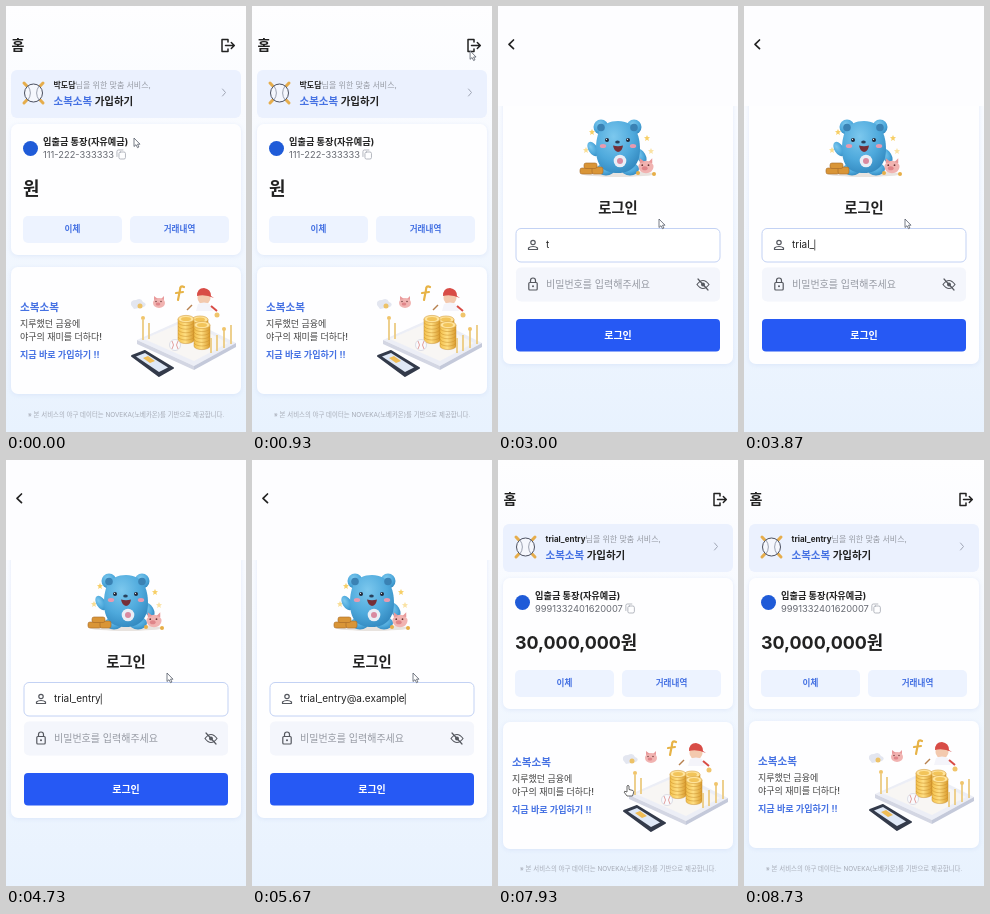
An HTML page that plays this animation: 240x426 px, repeating every 8.79 s.

```html
<!DOCTYPE html>
<html lang="ko">
<head>
<meta charset="utf-8">
<title>홈</title>
<style>
  html, body { margin: 0; width: 100%; height: 100%; overflow: hidden; background: #fff; }
  svg { display: block; width: 100vw; height: 100vh; }
  text { font-family: Inter, "Noto Sans CJK KR", "Noto Sans CJK", sans-serif; fill: #222; white-space: pre; }
  .b { font-weight: 700; }
  .blue { fill: #4672e3; }
  .mid { text-anchor: middle; }
  .hint { fill: #969aa3; }
  .line { fill: none; stroke: #222; stroke-linecap: round; stroke-linejoin: round; }
  .card { fill: #fefeff; filter: drop-shadow(0 1px 2px #b9cdf055); }
</style>
</head>
<body>
<svg viewBox="0 0 240 426" preserveAspectRatio="none">
  <defs>
    <linearGradient id="bg" x2="0" y2="1">
      <stop offset="0" stop-color="#fefeff"/><stop offset=".16" stop-color="#fbfcff"/>
      <stop offset="1" stop-color="#e8f2fe"/>
    </linearGradient>
    <linearGradient id="gold">
      <stop offset="0" stop-color="#f3c04b"/><stop offset=".45" stop-color="#ffdf83"/>
      <stop offset="1" stop-color="#d99a2b"/>
    </linearGradient>
    <radialGradient id="fur" cx=".4" cy=".3" r=".75">
      <stop offset="0" stop-color="#7cc8ee"/><stop offset=".6" stop-color="#4ea9dc"/>
      <stop offset="1" stop-color="#3288bf"/>
    </radialGradient>
    <path id="star" d="M0-3 .9-.9 3-.8 1.3.7 1.9 3 0 1.7-1.9 3-1.3.7-3-.8-.9-.9Z" fill="#f7cf67"/>
    <g id="pig">
      <ellipse rx="6" ry="5" fill="#f1b3b1"/><path d="M-5-3-5-7-1-4M2-4 5-7 5-3" fill="#e99a9b"/>
      <ellipse cx="-1" cy="1" rx="2.3" ry="1.6" fill="#df8589"/>
      <circle cx="-3" cy="-1.5" r=".7" fill="#633"/><circle cx="2" cy="-1.5" r=".7" fill="#633"/>
    </g>
    <g id="ball">
      <circle r="5.5" fill="#fafafd" stroke="#c8cbd8" stroke-width=".6"/>
      <path d="M-3-4Q0 0-3 4M3-4Q0 0 3 4" fill="none" stroke="#d77b77" stroke-width=".7"/>
    </g>
  </defs>

  <rect width="240" height="426" fill="url(#bg)"/>

  <g id="home">
    <text x="5.5" y="44" font-size="14" font-weight="600">홈</text>
    <path class="line" stroke-width="1.5" d="M222 36V33.5H216V45.500H222V43M219.500 39.500H228M225.300 36.500 228.300 39.500 225.300 42.500"/>

    <rect x="5" y="64" width="230" height="48" rx="6" fill="#ebf1fe"/>
    <g>
      <path d="M18 77 37 97M37 77 18 97" stroke="#e6ad4c" stroke-width="3" stroke-linecap="round"/>
      <circle cx="27.500" cy="87" r="9" fill="#f5f7fd" stroke="#4b5060"/>
      <path class="line" style="stroke:#858b9c" stroke-width=".8" d="M22 80Q27 87 22 94M33 80Q28 87 33 94"/>
    </g>
    <text x="47.500" y="82" font-size="8"><tspan id="name" class="b"></tspan><tspan class="hint">님을 위한 맞춤 서비스,</tspan></text>
    <text class="b" x="47.500" y="98.500" font-size="10.5"><tspan class="blue">소복소복</tspan> 가입하기</text>
    <path class="line" style="stroke:#a0a6b5" d="M216.500 83 219.500 86.500 216.500 90"/>

    <rect class="card" x="5" y="118" width="230" height="131" rx="7"/>
    <circle cx="24.500" cy="142.500" r="7.500" fill="#1f5bd8"/>
    <text class="b" x="37" y="138.500" font-size="9.2">입출금 통장(자유예금)</text>
    <text id="account" x="37" y="151.500" font-size="9.300" style="fill:#686b73"></text>
    <g id="copy" class="line" style="stroke:#a2a6b0" stroke-width=".8">
      <rect x="2" y="146" width="6.500" height="7" rx="1.500"/><path d="M0 150.500V145.500Q0 144 1.500 144H6"/>
    </g>
    <text id="balance" class="b" x="17" y="188.500" font-size="17.900"></text>
    <rect x="17" y="210" width="99" height="27" rx="5" fill="#edf3ff"/>
    <rect x="124" y="210" width="99" height="27" rx="5" fill="#edf3ff"/>
    <text class="b blue mid" x="66.500" y="226.300" font-size="8.600">이체</text>
    <text class="b blue mid" x="173.500" y="226.300" font-size="8.600">거래내역</text>

    <g id="promo">
      <rect class="card" x="5" y="261" width="230" height="127" rx="7"/>
      <text class="b blue" x="14" y="305" font-size="10.600">소복소복</text>
      <text x="14" y="321" font-size="9" font-weight="500" style="fill:#444">지루했던 금융에</text>
      <text x="14" y="333.500" font-size="9" font-weight="500" style="fill:#444">야구의 재미를 더하다!</text>
      <text class="b blue" x="14" y="352" font-size="9.100">지금 바로 가입하기 !!</text>
      <path d="M131 334 180 312 230 337 188 360Z" fill="#eceef6"/>
      <path d="M131 334 188 360V364L131 338Z" fill="#d3d6e3"/><path d="M188 360 230 337V341L188 364Z" fill="#c4c9da"/>
      <path d="M138 333 180 315 222 337 188 355Z" fill="#f8f6f4"/>
      <g id="coins"></g>
      <path d="M137 314V334M143 317V333M205 332V347M211 329V345M218 324V342M225 319V338" stroke="#eccb82" stroke-width="1.800"/>
      <g fill="#f0c56b"><circle cx="137" cy="312" r="2"/><circle cx="218" cy="323" r="2"/><circle cx="211" cy="309" r="2.500"/></g>
      <use href="#ball" x="169" y="339"/>
      <path d="M126 350 139 345 167 362 153 370Z" fill="#333a4a" stroke="#333a4a" stroke-width="2" stroke-linejoin="round"/>
      <path d="M130 350.500 139 347 162 361.500 153 366Z" fill="#dfe8f6"/>
      <path d="M137 352 142 350 149 355 144 357Z" fill="#f0bd55"/>
      <use href="#pig" x="153" y="297"/>
      <path d="M125 299Q124 294 130 294 135 291 137 296 142 298 138 301L128 303Z" fill="#e3e6f0"/>
      <circle cx="134" cy="300" r="2.500" fill="#edc267"/>
      <path d="M178 281Q174 279 174 284L172 294M170 287 177 286" fill="none" stroke="#e7b347" stroke-width="2.200" stroke-linecap="round"/>
      <circle cx="198" cy="292" r="6.500" fill="#f3c9ae"/>
      <path d="M191 290Q191 282 198 282 205 283 205 290L208 292Q199 288 191 290Z" fill="#d84c46"/>
      <path d="M192 298Q198 295 204 298L207 305H190Z" fill="#f4f4fa"/><path d="M205 300 211 305" stroke="#d84c46" stroke-width="2"/>
      <path d="M181 304 186 299" stroke="#b78150" stroke-width="1.500"/>
    </g>
    <text class="mid" x="120" y="410.500" font-size="6.400" style="fill:#a5aab5">※ 본 서비스의 야구 데이터는 NOVEKA(노베카온)를 기반으로 제공합니다.</text>
  </g>

  <g id="login">
    <rect class="card" x="5" y="92" width="230" height="266" rx="7"/>
    <rect width="240" height="100" fill="#fdfdff"/>
    <path class="line" stroke-width="1.700" d="M15.500 34 11 38.300 15.500 42.600"/>
    <g id="bear">
      <use href="#star" x="94" y="126"/><use href="#star" x="149" y="132"/>
      <use href="#star" x="88" y="144" opacity=".7"/><use href="#star" x="153" y="145" opacity=".6"/>
      <ellipse cx="120" cy="168" rx="36" ry="3" fill="#e8e3df"/>
      <g fill="url(#fur)">
        <circle cx="103" cy="121" r="7.500"/><circle cx="136" cy="121" r="7.500"/>
        <ellipse cx="95" cy="143" rx="4.500" ry="8" transform="rotate(-32 95 143)"/>
        <ellipse cx="143" cy="150" rx="4.500" ry="8" transform="rotate(-30 143 150)"/>
        <ellipse cx="108" cy="163" rx="9" ry="6.500"/><ellipse cx="132" cy="163" rx="9" ry="6.500"/>
        <path d="M120 115C137 115 142 129 142 143S135 167 120 167 98 159 98 143 103 115 120 115Z"/>
      </g>
      <circle cx="103" cy="121.500" r="3.800" fill="#3a82b4"/><circle cx="136" cy="121.500" r="3.800" fill="#3a82b4"/>
      <circle cx="109" cy="134" r="2" fill="#242b3b"/><circle cx="130" cy="134" r="2" fill="#242b3b"/>
      <circle cx="108.500" cy="133.300" r=".6" fill="#fff"/><circle cx="129.500" cy="133.300" r=".6" fill="#fff"/>
      <ellipse cx="105" cy="140" rx="3.200" ry="2" fill="#e69ab0"/><ellipse cx="135" cy="140" rx="3.200" ry="2" fill="#e69ab0"/>
      <ellipse cx="119.500" cy="136" rx="2.300" ry="1.500" fill="#29415c"/>
      <path d="M115 139.500Q120 141 125 139.500 124 146 120 146 116 145 115 139.500Z" fill="#762f37"/>
      <circle cx="122" cy="155" r="6.300" fill="#e9eef6"/><circle cx="122" cy="155" r="3" fill="#d98aa0"/>
      <g fill="#d99537" stroke="#a76928" stroke-width=".6">
        <rect x="82" y="162" width="13" height="6" rx="2"/><rect x="94" y="161" width="11" height="7" rx="2"/><rect x="86" y="157" width="13" height="5.500" rx="2"/>
      </g>
      <use href="#pig" transform="translate(148 161) scale(1.25)"/>
      <circle cx="140" cy="167" r="2" fill="#e7ae47"/><circle cx="156" cy="168" r="2" fill="#e7ae47"/>
    </g>
    <text class="b mid" x="120" y="207.300" font-size="14.300">로그인</text>
    <rect id="idBox" x="18" y="222.500" width="204" height="33.500" rx="5"/>
    <rect id="pwBox" x="18" y="261.500" width="204" height="34" rx="5"/>
    <g class="line" style="stroke:#55585f" stroke-width="1.200">
      <circle cx="35" cy="236.500" r="2.200"/><path d="M30.500 243.500V242Q32 240.500 35 240.500T39.500 242V243.500Z"/>
      <rect x="30.800" y="276.500" width="8.400" height="7.500" rx="1"/><path d="M32.500 276.500V274.500Q32.500 272 35 272T37.500 274.500V276.500"/>
      <path d="M199 278.500Q205 270.500 211 278.500 205 286.500 199 278.500Z"/><path d="M200 273 210 284"/>
    </g>
    <circle cx="35" cy="280.200" r="1" fill="#55585f"/><circle cx="205" cy="278.500" r="2" fill="#55585f"/>
    <text id="idText" x="48" y="242.300" font-size="10"></text>
    <text id="pwText" x="48" y="282" font-size="10"></text>
    <path id="caret" d="M0 0V11" stroke="#333" stroke-width=".8"/>
    <rect id="submit" x="18" y="313" width="204" height="32.500" rx="4"/>
    <text class="b mid" x="120" y="332.500" font-size="10" style="fill:#fff">로그인</text>
    <g id="toast">
      <rect x="63.500" y="357" width="115" height="34" rx="10" fill="#414147" style="filter:drop-shadow(1px 3px 2px #0007)"/>
      <text class="mid" x="120.500" y="377.500" font-size="10" font-weight="500" style="fill:#f5f5f5">로그아웃되었습니다.</text>
    </g>
  </g>

  <g id="pointer">
    <path id="arrow" d="M0 0V8.500L2 6.700 3.500 9.700 4.900 9 3.500 6.200H6Z" fill="#fff" stroke="#555b68" stroke-width=".8"/>
    <path id="hand" d="M-1 0Q0-1.500 1 0V3.500L5 4.500Q6 5 5.500 7L4.500 10H-1L-4 6Q-4 4.500-1 6Z" fill="#fff" stroke="#444" stroke-width=".8"/>
  </g>
</svg>
<script>
const LOOP = 8790, LOGOUT = 1700, ENTER = 7400;
const USER = 'trial_entry', DOMAIN = '@a.example';
const $ = id => document.getElementById(id);
const el = Object.fromEntries([...document.querySelectorAll('[id]')].map(n => [n.id, n]));
const show = (node, on) => node.setAttribute('visibility', on ? 'inherit' : 'hidden');
const setText = (node, s) => { if (node.textContent !== s) node.textContent = s; };
const clamp = (v, lo, hi) => Math.min(hi, Math.max(lo, v));
const typed = (t, start, step, max) => clamp(Math.floor((t - start) / step) + 1, 0, max);

// time, x, y
const route = [
  [0, 128, 132], [350, 128, 132], [1000, 221, 42], [2000, 221, 42], [2600, 161, 213],
  [6700, 161, 213], [7100, 130, 326], [8050, 130, 326], [8450, 150, 432], [LOOP, 150, 432]
];

function pointerAt(t) {
  const i = route.findIndex((p, k) => k && t <= p[0]);
  const [t0, x0, y0] = route[i - 1], [t1, x1, y1] = route[i];
  const u = (t - t0) / (t1 - t0), e = u * u * (3 - 2 * u);
  return [x0 + (x1 - x0) * e, y0 + (y1 - y0) * e];
}

function stack(x, base, count) {
  let s = '';
  for (let i = 0; i < count; i++) {
    const y = base - i * 3.6;
    s += `<path d="M${x - 8} ${y - 3}V${y}A8 3.6 0 0 0 ${x + 8} ${y}V${y - 3}Z" fill="url(#gold)" stroke="#c98e2c" stroke-width=".5"/>`;
  }
  const top = base - count * 3.6 + .6;
  return s + `<ellipse cx="${x}" cy="${top}" rx="8" ry="3.6" fill="#ffe39a" stroke="#d6a040" stroke-width=".6"/>
    <ellipse cx="${x}" cy="${top}" rx="5" ry="2" fill="#f2c45a"/>`;
}
el.coins.innerHTML = stack(194, 331, 5) + stack(180, 334, 6) + stack(196, 340, 6);

function drawHome(t) {
  const member = t >= ENTER;
  setText(el.name, member ? USER : '박도담');
  setText(el.account, member ? '9991332401620007' : '111-222-333333');
  setText(el.balance, member ? '30,000,000원' : '원');
  el.copy.setAttribute('transform', `translate(${40 + el.account.getComputedTextLength()} 0)`);
  const hover = member && t < 8200;
  el.promo.setAttribute('transform', `translate(0 ${hover ? 1 : 0})`);
}

function drawField(box, text, value, hint, focused) {
  box.setAttribute('fill', focused ? '#fff' : '#f4f6fc');
  box.setAttribute('stroke', focused ? '#c3d2f4' : 'none');
  setText(text, value || hint);
  text.setAttribute('class', value ? '' : 'hint');
  return value ? text.getComputedTextLength() : 0;
}

function drawLogin(t) {
  const onId = t >= 2700 && t < 5750, onPw = t >= 5750;
  const id = USER.slice(0, typed(t, 2940, 170, USER.length)) + DOMAIN.slice(0, typed(t, 4800, 85, DOMAIN.length));
  const pw = '•'.repeat(typed(t, 5850, 95, 8));
  const idEnd = drawField(el.idBox, el.idText, id, '아이디를 입력해주세요', onId);
  const pwEnd = drawField(el.pwBox, el.pwText, pw, '비밀번호를 입력해주세요', onPw);
  show(el.caret, (onId || onPw) && (t + 880) % 1060 < 530);
  el.caret.setAttribute('transform', `translate(${48.6 + (onPw ? pwEnd : idEnd)} ${onPw ? 273 : 233.5})`);
  show(el.bear, t >= 1930);
  show(el.toast, t < 2870);
  el.submit.setAttribute('fill', t < 1930 ? '#1b6fee' : '#2659f4');
}

function render(t) {
  const login = t >= LOGOUT && t < ENTER;
  show(el.home, !login);
  show(el.login, login);
  login ? drawLogin(t) : drawHome(t);
  const [x, y] = pointerAt(t);
  el.pointer.setAttribute('transform', `translate(${x} ${y})`);
  const hand = t > 7050 && t < 8200;
  show(el.arrow, !hand);
  show(el.hand, hand);
}

const start = performance.now();
function tick() {
  render((performance.now() - start) % LOOP);
  requestAnimationFrame(tick);
}
tick();
</script>
</body>
</html>
```
